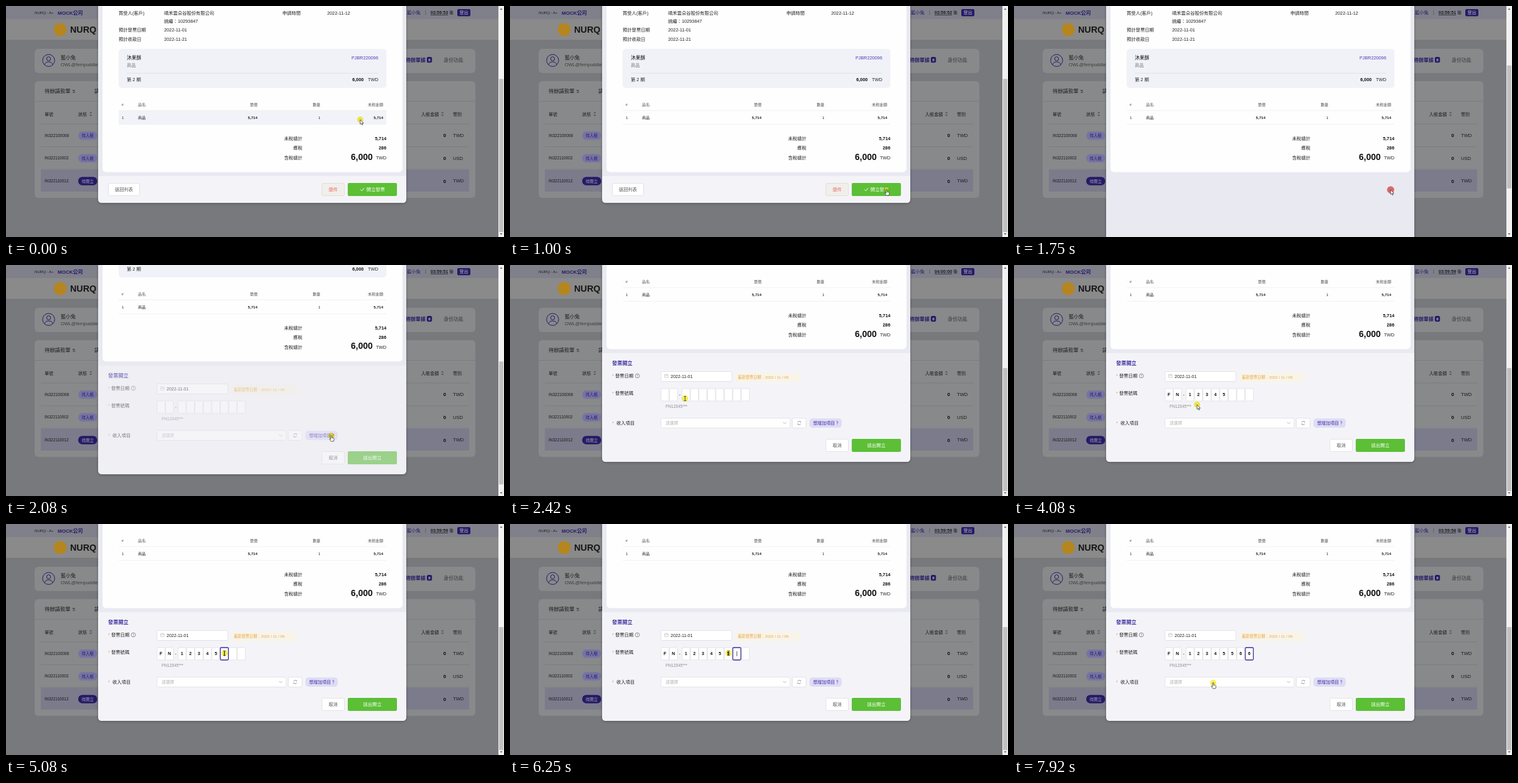
An HTML page that plays this animation: 800 by 372 pixels, repeating every 8000 ms.

```html
<!DOCTYPE html>
<html lang="zh-Hant">
<head>
<meta charset="utf-8">
<title>發票開立</title>
<style>
  html, body { margin: 0; width: 100%; height: 100%; overflow: hidden; background: #77797d; }
  svg { display: block; width: 800px; height: 372px; }
  text { font-family: "Liberation Sans", "Noto Sans CJK TC", "Noto Sans CJK", sans-serif; white-space: pre; }
</style>
</head>
<body>
<svg id="stage" viewBox="0 0 800 372"></svg>
<script>
const LOOP = 8000, STEP = 1000 / 12, SCROLL_END = 132;
const PURPLE = '#3d2fa0', INK = '#222', DIM = '#1c1c1f', DIM_PURPLE = '#261a66', EDGE = '#dcdce2';

const rect = (x, y, w, h, fill, r = 0, more = '') =>
  `<rect x="${x}" y="${y}" width="${w}" height="${h}" rx="${r}" fill="${fill}" ${more}/>`;
const framed = (x, y, w, h, fill = '#fff', r = 2, stroke = EDGE) =>
  rect(x + .5, y + .5, w - 1, h - 1, fill, r, `stroke="${stroke}" stroke-width=".8"`);
const line = (x1, x2, y, color) =>
  `<path d="M${x1} ${y}H${x2}" stroke="${color}" stroke-width=".7"/>`;
const stroke = (d, color, width = .8) =>
  `<path d="${d}" fill="none" stroke="${color}" stroke-width="${width}"/>`;
const text = (x, y, s, size = 7.3, fill = INK, more = '') =>
  `<text x="${x}" y="${y}" font-size="${size}" fill="${fill}" ${more}>${s}</text>`;
const BOLD = 'font-weight="700"', END = 'text-anchor="end"', MID = 'text-anchor="middle"';
const group = (id, body, more = '') => `<g id="${id}" ${more}>${body}</g>`;

const sorter = (x, y) =>
  `<path d="M${x} ${y - 1}l2.2-2.6 2.2 2.6zM${x} ${y + 1}l2.2 2.6 2.2-2.6z" fill="#55565a"/>`;

function page() {
  const rows = [
    ['IN322100008', '待入帳', 'TWD'],
    ['IN322110002', '待入帳', 'USD'],
    ['IN322110012', '待開立', 'TWD'],
  ];
  const table = rows.map(([id, state, money], i) => {
    const y = 190 + i * 36.6, last = i === 2;
    return (last ? rect(56, y + .6, 688, 35, '#7b7b8b') : line(56, 744, y + 36.6, '#77787c')) +
      text(62, y + 20.8, id, 6.5, DIM) +
      rect(116, y + 12, 30.5, 13.5, last ? DIM_PURPLE : '#7674a4', 6.5) +
      text(131.2, y + 21.3, state, 6.5, last ? '#a8a8b4' : DIM_PURPLE, MID) +
      text(707, y + 21.4, '0', 8, '#111', `${BOLD} ${END}`) +
      text(718, y + 21.2, money, 7.6, DIM);
  }).join('');
  return rect(0, 0, 800, 372, '#77797d') +
    rect(0, 0, 800, 21, '#7f808a') + rect(0, 21, 800, 34, '#8a8a8b') + line(0, 800, 55, '#6e7074') +
    text(46, 13, 'NURQ - A+', 6.1, DIM) +
    text(83, 13.5, 'MOCK公司', 8, DIM_PURPLE, BOLD) +
    text(644, 13.3, '藍小兔', 7.3, DIM_PURPLE) +
    stroke('M674 7V14', '#55565c', .7) +
    text(682, 13, '', 7, DIM, `${BOLD} id="clock" text-decoration="underline"`) +
    text(712, 13.3, '後', 7, DIM) +
    rect(725, 5, 21, 11.5, DIM_PURPLE, 2) + text(735.5, 13.4, '登出', 7, '#b9b9c2', MID) +
    '<circle cx="87" cy="38" r="10.5" fill="#b5851f"/>' +
    text(103, 43, 'NURQ', 14.3, '#161616', BOLD) +
    rect(46, 69, 708, 39, '#88898b', 6) +
    '<circle cx="68.5" cy="87.7" r="9.7" fill="none" stroke="#261a66"/>' +
    '<circle cx="68.5" cy="85" r="3.2" fill="none" stroke="#261a66"/>' +
    stroke('M62 94.5Q63 90 68.5 90T75 94.5', DIM_PURPLE, 1) +
    text(88, 86, '藍小兔', 8, DIM) + text(88, 96.6, 'OWL@fernpuddles', 7.4, '#3c3c40') +
    text(642, 90, '待辦單據', 8, DIM_PURPLE, BOLD) +
    rect(676, 82, 8.3, 9.3, DIM_PURPLE, 2.5) + text(680.1, 89, '8', 6, '#b9b9c2', MID + BOLD.padStart(18)) +
    text(703, 90, '身份功能', 7.9, '#3c3c40') +
    rect(46, 121, 708, 188, '#88898b', 6) +
    text(62, 140.3, '待辦請款單', 8.3, DIM) + text(107, 140, '5', 7, DIM) + text(142, 140.3, '請', 8.3, DIM) +
    line(46, 754, 153.5, '#77787c') + line(56, 744, 190, '#77787c') +
    text(62, 176.5, '單號', 7, DIM) + text(116, 176.5, '狀態', 7, DIM) + sorter(134, 174) +
    text(667, 176.5, '入帳金額', 7.1, DIM) + sorter(699, 174) + text(718, 176.5, '幣別', 7.1, DIM) +
    table;
}

function invoice() {
  const item = [[404, '單價', '5,714', BOLD], [505, '數量', '1', ''], [606, '未稅金額', '5,714', BOLD]];
  return rect(155, -10, 482, 277.5, '#fefefe', 6) +
    text(181, 14.4, '買受人(客戶)') + text(254, 14.4, '晴禾雲朵谷股份有限公司') +
    text(444, 14.4, '申請時間') + text(516, 14.4, '2022-11-12') +
    text(254, 26.8, '統編：10293847') +
    text(181, 41.4, '預計發票日期') + text(254, 41.4, '2022-11-01') +
    text(181, 56, '預計收款日') + text(254, 56, '2022-11-21') +
    rect(181, 69, 430, 63, '#f1f2f7', 5) +
    text(194, 85.8, '沐果酥', 7.8, '#111') + text(598, 85.6, 'PJBR220096', 7.3, '#4a3cc0', END) +
    text(194, 98, '商品', 7.3, '#777') + line(194, 598, 108.3, '#d9dae2') +
    text(194, 120.6, '第 2 期') + text(574.5, 120.6, '6,000', 7.3, '#111', BOLD + ' ' + END) + text(598, 120.6, 'TWD', 7.3, INK, END) +
    rect(181, 168.5, 430, 22, '#f2f3f8', 0, 'id="hover"') +
    line(181, 611, 168.3, '#ececf0') + line(181, 611, 190.5, '#ececf0') +
    text(185.5, 161, '#', 6.2, '#555') + text(212, 161, '品名', 6.2, '#555') +
    text(186, 182, '1', 6.2) + text(212, 182, '商品', 6.2) +
    item.map(([x, head, value, weight]) =>
      text(x, 161, head, 6.2, '#555', END) + text(x, 182, value, 6.2, INK, END + ' ' + weight)).join('') +
    text(476, 215.8, '未稅總計', 7.3, INK, END) + text(611, 215.8, '5,714', 7.3, '#111', END + ' ' + BOLD) +
    text(476, 230.6, '應稅', 7.3, INK, END) + text(611, 230.6, '286', 7.3, '#111', END + ' ' + BOLD) +
    text(476, 247, '含稅總計', 7.3, INK, END) + text(589, 247.5, '6,000', 14, '#111', END + ' ' + BOLD) +
    text(611, 247.3, 'TWD', 7.3, INK, END);
}

const panel = (y, bottom) =>
  `<path d="M148 ${y}H643V${bottom - 6}q0 6-6 6H154q-6 0-6-6z" fill="#f4f4f8"/>`;

function footer() {
  return panel(274, 317) +
    framed(164, 285, 51, 21) + text(189.5, 298, '返回列表', 7.3, '#555', MID) +
    framed(507, 285, 37, 21, '#f1efec', 2, '#e3d8c8') + text(525.5, 298, '退件', 7.3, '#ea6a5a', MID) +
    rect(549, 285, 79, 21, '#5cbf36', 2) + stroke('M569.5 295.5l2 2.2 4-4.6', '#fff', 1) +
    text(579, 298, '開立發票', 7.4, '#fff');
}

// Ten cells: two letters, a dash, eight digits.
const cellX = i => i < 2 ? 242 + i * 13.6 : 275.8 + (i - 2) * 13.6;

function form() {
  const label = (x, y, s) => text(164, y, '*', 7, '#e58a7d') + text(x, y, s);
  const cells = Array.from({ length: 10 }, (_, i) =>
    framed(cellX(i), 198.5, 13.9, 21, '#fff', 1) +
    text(cellX(i) + 6.9, 211.3, '', 7, '#111', `${BOLD} ${MID} class="cell"`)).join('');
  return panel(142, 317) +
    text(164, 161, '發票開立', 8.2, PURPLE, BOLD) +
    label(169, 181.4, '發票日期') +
    '<circle cx="204.5" cy="178.5" r="3.4" fill="none" stroke="#666" stroke-width=".7"/>' +
    stroke('M204.5 176.5v2.4m0 .8v.8', '#666', .7) +
    framed(242, 171, 115, 17) + stroke('M248.5 176.5h5.5v5h-5.5zm0 2h5.5m-4-3v1.4m2.5-1.4v1.4', '#bbb', .6) +
    text(258, 182, '2022-11-01', 7) +
    rect(362, 173, 105, 16, '#f8f4e9', 2) + text(366, 183.4, '最新發票日期：2022 / 11 / 09', 6.25, '#e8a640') +
    label(169, 209, '發票號碼') + cells + text(271.5, 211, '-', 7) +
    rect(0, 199, 13, 20, 'none', 1.5, `id="focus" stroke="${PURPLE}" stroke-width="1.3"`) +
    rect(0, 205, .8, 8, '#333', 0, 'id="caret"') +
    text(250, 230.3, 'FN12345***', 6.6, '#8c8c90') +
    label(171, 256.8, '收入項目') +
    framed(242, 246, 208.5, 17) + text(250, 257, '請選擇', 6.7, '#b4b4b8') + stroke('M438.5 253l2.7 2.7 2.7-2.7', '#aaa') +
    framed(453, 246, 23, 17) + stroke('M462 253.4a2.6 2.6 0 0 1 4.8-.2v-1.6m.2 3.8a2.6 2.6 0 0 1-4.8.2v1.6', '#666', .7) +
    rect(481, 247, 52, 15, '#dfdcf6', 5) + text(487, 257, '想增加項目？', 7, PURPLE) +
    framed(507, 280, 37, 21) + text(525.5, 293, '取消', 7.3, '#555', MID) +
    rect(549, 280, 79, 21, '#5cbf36', 2) + text(588.5, 293.1, '送出開立', 7.4, '#fff', MID);
}

function pointer() {
  const solid = 'fill="#fff" stroke="#222" stroke-width=".7" stroke-linejoin="round"';
  return '<circle id="glow" r="5" style="mix-blend-mode:multiply"/>' +
    `<path class="shape" data-kind="arrow" d="M0 0V7.4L1.8 5.9 3 8.6 4.2 8 3.1 5.5H5.3z" ${solid}/>` +
    `<path class="shape" data-kind="hand" d="M-.9 0q.9-1 1.8 0V3.4L3.6 4Q4.6 4.4 4.4 6L3.7 9H-.6L-3 5.6q.2-1.2 1.2-.6l.9.8z" ${solid}/>` +
    '<path class="shape" data-kind="beam" d="M-1.8-3.6Q0-3.8 0-2.8 0-3.8 1.8-3.6M0-2.8V2.8M-1.8 3.6Q0 3.8 0 2.8 0 3.8 1.8 3.6" fill="none" stroke="#222" stroke-width=".8"/>';
}

function scrollbar() {
  return rect(791, 0, 9, 372, '#f1f1f1') + rect(792, 0, 7, 0, '#c1c1c1', 0, 'id="thumb"') +
    '<path d="M793.5 6l2-2.6 2 2.6zM793.5 366l2 2.6 2-2.6z" fill="#666"/>';
}

const stage = document.getElementById('stage');
stage.innerHTML = page() +
  group('dialog',
    rect(148, -20, 495, 0, '#e9e9f1', 6, 'id="sheet" style="filter:drop-shadow(0 1px 2px #0004)"') +
    invoice() + group('footer', footer()) +
    group('form', form(), `transform="translate(0 ${SCROLL_END})"`)) +
  scrollbar() + group('pointer', pointer());

const $ = id => document.getElementById(id);
const set = (id, attrs) => { for (const k in attrs) $(id).setAttribute(k, attrs[k]); };
const show = (el, on) => { el.style.display = on ? '' : 'none'; };
const cells = [...document.querySelectorAll('.cell')];
const shapes = [...document.querySelectorAll('.shape')];

// Tracks hold [time, value...]; `held` keeps the last value, `tween` blends.
const held = (track, t) => track.findLast(([at]) => at <= t)[1];
function tween(track, t) {
  const i = track.findLastIndex(([at]) => at <= t);
  const a = track[i], b = track[i + 1] || a;
  const p = a === b ? 0 : (t - a[0]) / (b[0] - a[0]);
  return a.slice(1).map((v, k) => v + (b[k + 1] - v) * p);
}

const path = [
  [0, 569, 183], [83, 570, 188], [250, 573, 212], [417, 573, 212], [667, 588, 268], [1000, 605, 296],
  [1750, 605, 296], [1917, 580, 291], [2083, 523, 275], [2250, 385, 237], [2417, 281, 215],
  [2667, 284, 224], [2917, 287, 226], [3917, 287, 226], [4083, 294, 225], [4333, 326, 217], [4667, 351, 208],
  [7583, 351, 208], [7750, 340, 228], [7917, 320, 256],
];
const kinds = [[0, 'arrow'], [830, 'hand'], [1660, 'arrow'], [2000, 'hand'], [2160, 'arrow'], [2330, 'beam'],
  [2660, 'arrow'], [4330, 'beam'], [7750, 'hand']];
const pressed = [[0, 0], [1580, 1], [1830, 0], [3420, 1], [3660, 0], [4750, 1], [5080, 0]];
const scroll = [[0, 0], [1750, 0], [1833, 20], [1917, 55], [2000, 88], [2083, 112], [2167, 126], [2250, SCROLL_END]];
const fade = [[0, 0], [1750, 0], [2083, .55], [2333, 1]];
const clock = [[0, '03:59:53'], [160, '03:59:52'], [1160, '03:59:51'], [2160, '04:00:00'], [3160, '03:59:59'], [7160, '03:59:58']];
const typed = [[0, ''], [3500, 'FN12345'], [5910, 'FN123455'], [6490, 'FN1234556'], [6990, 'FN12345566']];
const focus = [[0, -1], [4740, 7], [5910, 8], [6490, 9]];
const caret = [[0, 0], [4740, 1], [5160, 0], [5740, 1], [6990, 1], [7490, 0]];

function draw(t) {
  const [y] = tween(scroll, t), [x, py] = tween(path, t);
  const open = t >= 1660, total = open ? 669 : 537;
  const value = held(typed, t), at = held(focus, t), kind = held(kinds, t), down = held(pressed, t);

  set('dialog', { transform: `translate(0 ${-y})` });
  set('sheet', { height: (open ? 449 : 317) + 20 });
  set('form', { opacity: tween(fade, t)[0] });
  show($('footer'), !open);
  show($('hover'), t < 160);
  set('thumb', { y: 8 + (165 + y) / total * 356, height: 372 / total * 356 });
  $('clock').textContent = held(clock, t);

  cells.forEach((cell, i) => { cell.textContent = value[i] || ''; });
  show($('focus'), at >= 0);
  show($('caret'), held(caret, t));
  if (at >= 0) {
    set('focus', { x: cellX(at) + .5 });
    set('caret', { x: cellX(at) + (value[at] ? 9.6 : 6.6) });
  }

  set('pointer', { transform: `translate(${x} ${py})` });
  set('glow', { fill: down ? '#e8504a' : '#f7ee3c', opacity: down ? .8 : .9, r: down ? 5.8 : 5 });
  shapes.forEach(s => show(s, s.dataset.kind === kind));
}

let start;
function tick(now) {
  start ??= now;
  const t = (now - start) % LOOP;
  draw(Math.floor((t + 4) / STEP) * STEP);
  requestAnimationFrame(tick);
}
draw(0);
requestAnimationFrame(tick);
</script>
</body>
</html>
```
